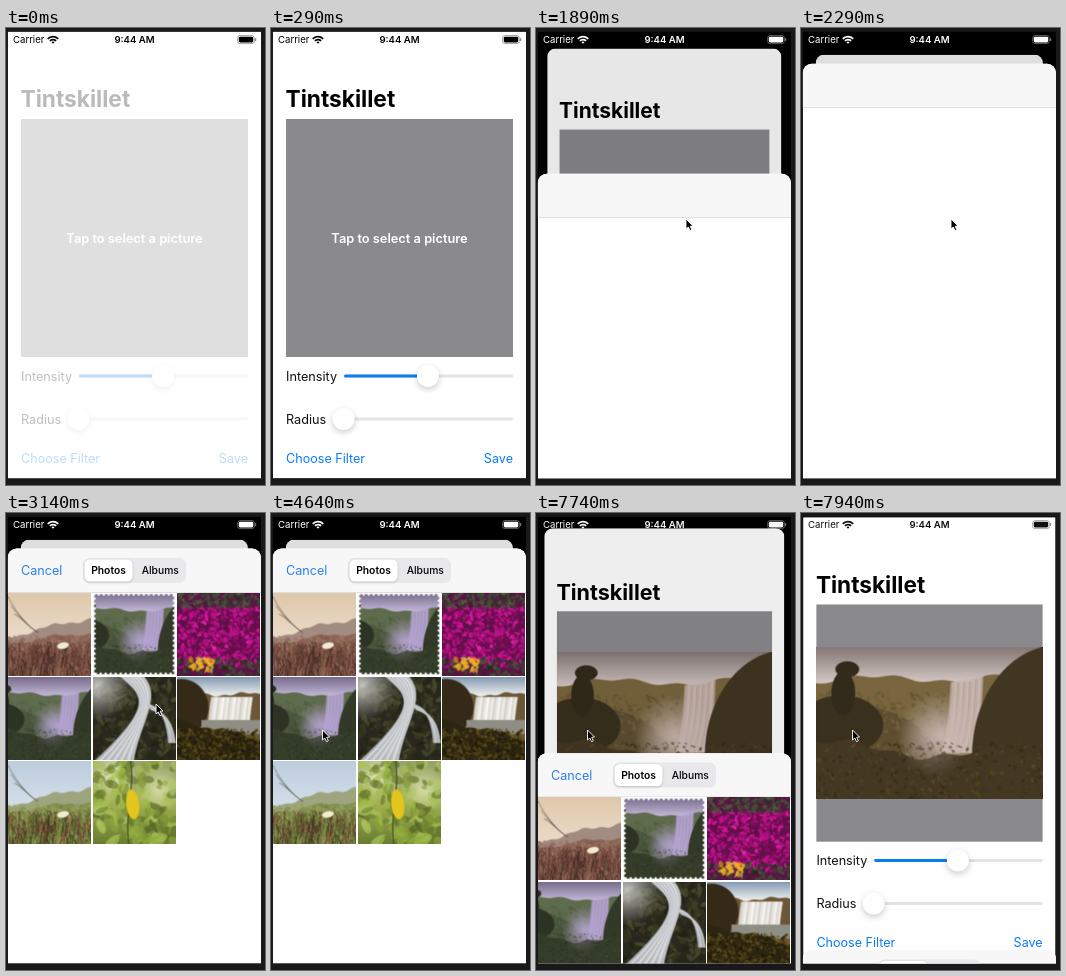
Animation of 259x457 px, one loop 7990 ms. Source, as an HTML page with a canvas:

```html
<!DOCTYPE html>
<html lang="en">
<head>
<meta charset="utf-8">
<title>Photo filter app</title>
<style>
html, body { margin: 0; width: 100%; height: 100%; overflow: hidden; background: #19191b; }
canvas { display: block; width: 259px; height: 457px; }
</style>
</head>
<body>
<canvas id="stage"></canvas>
<script>
const W = 259, H = 457, LOOP = 7990;
const SCREEN = { x: 1.7, y: 3.4, w: 253.3, h: 447.2 };
const BLUE = '#0a7cf5', SHEET_BLUE = '#2b80e8';
const CELL = 83;
const canvas = document.getElementById('stage');
const dpr = window.devicePixelRatio || 1;
canvas.width = W * dpr;
canvas.height = H * dpr;
const ctx = canvas.getContext('2d');

// ---------- drawing helpers ----------
function rect(g, color, x, y, w, h) {
  g.fillStyle = color;
  g.fillRect(x, y, w, h);
}

function fillScreen(color) {
  rect(ctx, color, SCREEN.x, SCREEN.y, SCREEN.w, SCREEN.h);
}

function roundPath(g, x, y, w, h, r) {
  g.beginPath();
  g.roundRect(x, y, w, h, r);
}

function round(g, color, x, y, w, h, r) {
  roundPath(g, x, y, w, h, r);
  g.fillStyle = color;
  g.fill();
}

function blob(g, color, x, y, rx, ry = rx, turn = 0) {
  g.beginPath();
  g.ellipse(x, y, rx, ry, turn, 0, 2 * Math.PI);
  g.fillStyle = color;
  g.fill();
}

function curve(g, color, width, x, y, ...p) {
  g.beginPath();
  g.moveTo(x, y);
  g.bezierCurveTo(...p);
  g.strokeStyle = color;
  g.lineWidth = width;
  g.stroke();
}

function text(str, x, y, size, color, weight = 400, align = 'left') {
  ctx.font = `${weight} ${size}px Inter, "Liberation Sans", sans-serif`;
  ctx.textAlign = align;
  ctx.fillStyle = color;
  ctx.fillText(str, x, y);
}

function withShadow(alpha, blur, drop, paint) {
  ctx.save();
  ctx.shadowColor = `rgba(0,0,0,${alpha})`;
  ctx.shadowBlur = blur * dpr;
  ctx.shadowOffsetY = drop * dpr;
  paint();
  ctx.restore();
}

// ---------- picture helpers ----------
const hsl = (h, s, l, a = 1) => `hsla(${h},${s}%,${l}%,${a})`;

function random(seed) {
  return () => (seed = (seed * 16807) % 2147483647) / 2147483647;
}

function fade(g, h, ...colors) {
  const f = g.createLinearGradient(0, 0, 0, h);
  colors.forEach((c, i) => f.addColorStop(i / (colors.length - 1), c));
  return f;
}

function glow(g, rgb, alpha, x, y, r) {
  const f = g.createRadialGradient(x, y, 0, x, y, r);
  f.addColorStop(0, `rgba(${rgb},${alpha})`);
  f.addColorStop(1, `rgba(${rgb},0)`);
  rect(g, f, x - r, y - r, 2 * r, 2 * r);
}

// uneven land from height y0 on the left to y1 on the right
function ridge(g, color, w, y0, y1, rough) {
  g.beginPath();
  g.moveTo(0, 200);
  for (let x = 0; x <= w; x++) {
    const k = x / w;
    g.lineTo(x, y0 + (y1 - y0) * k + rough * (Math.sin(k * 9 + y0) + .4 * Math.sin(k * 31)));
  }
  g.lineTo(w, 200);
  g.fillStyle = color;
  g.fill();
}

// leafy texture below height y
function specks(g, n, size, w, y, h, hue, sat, light, spread = 10) {
  const rnd = random(n + 5);
  for (let i = 0; i < n; i++)
    blob(g, hsl(hue, sat, light + (rnd() - .5) * 2 * spread, .7),
      rnd() * w, y + rnd() * h, size * (.5 + rnd()), size * (.3 + rnd() * .5), rnd() * 3);
}

function picture(w, h, paint) {
  const c = document.createElement('canvas');
  c.width = w * 2;
  c.height = h * 2;
  const g = c.getContext('2d');
  g.scale(2, 2);
  paint(g);
  g.setTransform(1, 0, 0, 1, 0, 0);
  g.filter = 'blur(1.3px)';
  g.drawImage(c, 0, 0);
  return c;
}

// ---------- pictures ----------
function gorge(g, hue, sat, mist) {
  const tone = l => hsl(hue, sat, l);
  rect(g, `rgb(${mist})`, 0, 0, 227, 152);
  rect(g, fade(g, 40, 'rgba(0,0,0,.35)', 'rgba(255,255,255,.35)'), 0, 0, 227, 152);
  ridge(g, tone(36), 227, 34, 28, 4);
  blob(g, tone(28), 40, 125, 85, 66);
  specks(g, 250, 2.5, 130, 45, 75, hue, sat, 32, 6);
  glow(g, mist, .9, 125, 88, 44);
  for (let i = 0; i < 16; i++)
    curve(g, `rgba(${mist},${.65 + i % 3 * .15})`, 3, 136 + i * 2, 35 - i * .4, 135 + i * 2, 60, 134 + i * 2, 80, 126 + i * 2, 106);
  blob(g, tone(19), 242, 110, 86, 112);
  blob(g, tone(17), 25, 78, 42, 30);
  blob(g, tone(15), 27, 46, 12, 22);
  blob(g, tone(15), 31, 22, 12, 8);
  ridge(g, tone(20), 227, 98, 112, 6);
  specks(g, 420, 2, 227, 96, 56, hue, sat + 8, 20, 7);
  glow(g, mist, .35, 118, 98, 34);
}

const brown = g => gorge(g, 40, 32, '205,186,182');

function violet(g) {
  g.save();
  g.scale(CELL / 152, CELL / 152);
  g.translate(-37, 0);
  gorge(g, 85, 17, '182,164,212');
  g.restore();
}

function torn(g) {
  violet(g);
  g.strokeStyle = '#fff';
  for (const width of [3, 6]) {
    g.lineWidth = width;
    g.strokeRect(0, 0, CELL, CELL);
    g.setLineDash([2, 3]);
  }
}

function meadow(g, sky, hue, sat, red) {
  rect(g, sky, 0, 0, CELL, CELL);
  rect(g, fade(g, 40, 'rgba(255,255,255,0)', 'rgba(255,255,255,.3)'), 0, 0, CELL, CELL);
  ridge(g, hsl(hue, sat * .5, 57), CELL, 44, 25, 2);
  ridge(g, hsl(hue, sat * .8, 44), CELL, 50, 40, 2);
  specks(g, 260, 1.8, CELL, 44, 24, hue, sat * .8, 46, 10);
  for (let i = 0; i < 3; i++) curve(g, hsl(hue, 12, 32, .8), .6, i * 3, 4 + i * 9, 8, 20, 20, 34, 30, 40);
  const rnd = random(9);
  for (let i = 0; i < 420; i++) {
    const x = rnd() * 86, y = 60 + rnd() * 30;
    curve(g, hsl(i % 3 ? hue : red, sat, 18 + rnd() * 26), .9, x, y, x, y - 4, x + 1, y - 8, x + rnd() * 8 - 4, y - 11);
  }
  blob(g, '#f3ead2', 55, 53, 6, 3.2, -.2);
}

function blossoms(g) {
  rect(g, hsl(318, 70, 22), 0, 0, CELL, CELL);
  specks(g, 650, 2.3, CELL, 14, 60, 318, 85, 38, 17);
  specks(g, 180, 2.3, CELL, 0, 15, 95, 18, 25);
  specks(g, 140, 2.2, CELL, 66, 18, 100, 25, 22);
  g.translate(12, 0);
  specks(g, 28, 3, 24, 66, 12, 42, 92, 54);
}

function rapids(g) {
  rect(g, hsl(60, 12, 14), 0, 0, CELL, CELL);
  specks(g, 280, 4, CELL, 0, CELL, 62, 25, 18, 9);
  glow(g, '225,225,225', .8, 4, 8, 36);
  for (let i = 0; i < 22; i++) {
    const white = hsl(220, 6, 68 + i * 7 % 27, .85);
    curve(g, white, 2.4, 27 + i, -2, 50 + i, 18, 66 - i, 26 + i, 2 + i * 1.8, 85);
    if (i < 7) curve(g, white, 1.6, 52 + i, 26 + i, 68, 30 + i, 74 + i, 40, 76 + i, 66);
  }
}

function cove(g) {
  rect(g, fade(g, 36, '#8499b2', '#e9ecea', '#f0e6d2'), 0, 0, CELL, CELL);
  ridge(g, hsl(36, 32, 32), CELL, 16, 18, 2);
  for (let i = 0; i < 18; i++)
    curve(g, hsl(40, 15, 80 + i * 7 % 18), 2.6, 35 + i * 2.3, 20, 34 + i * 2.3, 26, 33 + i * 2.3, 34, 32 + i * 2.3, 44);
  blob(g, hsl(36, 38, 15), 4, 30, 27, 28);
  rect(g, '#8f8e84', 24, 43, 60, 14);
  ridge(g, hsl(44, 45, 12), CELL, 43, 62, 2);
  specks(g, 380, 2, CELL, 53, 32, 46, 55, 17, 12);
}

function leaves(g) {
  rect(g, fade(g, CELL, '#98a36c', '#a3b153', '#687c30'), 0, 0, CELL, CELL);
  glow(g, '238,240,215', .9, 20, 14, 26);
  glow(g, '228,232,190', .8, 66, 28, 24);
  specks(g, 130, 6, CELL, 0, CELL, 74, 46, 43, 17);
  curve(g, hsl(80, 35, 24), 1.3, 38, 0, 42, 30, 32, 50, 36, CELL);
  blob(g, '#e3c51d', 40, 43, 6.5, 15, -.1);
}

const photo = picture(227, 152, brown);
const thumbs = [
  g => meadow(g, '#dfc8ab', 18, 30, 6), torn, blossoms,
  violet, rapids, cove,
  g => meadow(g, '#bdcddd', 72, 36, 8), leaves
].map(paint => picture(CELL, CELL, paint));

// ---------- interface ----------
function slider(label, y, x, knob) {
  text(label, 15, y + 4.5, 12.7, '#111');
  round(ctx, '#e4e4e6', x, y - 1.5, 242 - x, 3, 1.5);
  if (knob > x + 11) round(ctx, BLUE, x, y - 1.5, knob - x, 3, 1.5);
  withShadow(.2, 6, 2.5, () => blob(ctx, '#fff', knob, y, 11));
}

function drawMain(t) {
  fillScreen('#fff');
  text('Tintskillet', 14.5, 79, 22.7, '#000', 700);
  rect(ctx, '#8a8a8d', 15, 91, 227, 238);
  if (t >= 6940) ctx.drawImage(photo, 15, 134, 227, 152);
  else text('Tap to select a picture', 128.5, 214.5, 12.8, '#fff', 600, 'center');
  slider('Intensity', 348, 73, 157);
  slider('Radius', 391, 62, 72.5);
  const tint = t >= 1490 && t < 7700 ? '#aaaaac' : BLUE;
  text('Choose Filter', 15, 434.5, 12.6, tint);
  text('Save', 242, 434.5, 12.6, tint, 400, 'right');
  const veil = Math.max(0, .73 * (1 - t / 290));
  rect(ctx, `rgba(255,255,255,${veil})`, SCREEN.x, 22, SCREEN.w, 428.6);
}

// the main view shrinks into a dimmed card behind the sheet
function drawCard(t, p) {
  const s = 1 - .103 * p;
  ctx.save();
  ctx.translate(SCREEN.x + 13 * p, SCREEN.y + 23.4 * p);
  ctx.scale(s, s);
  ctx.translate(-SCREEN.x, -SCREEN.y);
  roundPath(ctx, SCREEN.x, SCREEN.y, SCREEN.w, SCREEN.h, 9 * Math.min(1, p * 2));
  ctx.clip();
  drawMain(t);
  fillScreen(`rgba(0,0,0,${.13 * p})`);
  ctx.restore();
}

function drawStatus(p) {
  const v = Math.round(255 * Math.min(1, p * 1.9));
  const c = `rgb(${v},${v},${v})`;
  text('Carrier', 7, 15, 9.6, c);
  text('9:44 AM', 128.5, 15, 9.6, c, 600, 'center');
  ctx.strokeStyle = c;
  ctx.lineWidth = 1.8;
  for (let r = 1.2; r < 8; r += 3) {
    ctx.beginPath();
    ctx.arc(47, 15.8, r, -Math.PI * .76, -Math.PI * .24);
    ctx.stroke();
  }
  ctx.globalAlpha = .45;
  ctx.lineWidth = .8;
  roundPath(ctx, 231.7, 7.6, 16.6, 8, 2.3);
  ctx.stroke();
  round(ctx, c, 249, 10, 1.2, 3, .6);
  ctx.globalAlpha = 1;
  round(ctx, c, 232.8, 8.7, 14.4, 5.8, 1.4);
}

function drawSheet(t, p) {
  ctx.save();
  ctx.translate(0, 415 * (1 - p));
  roundPath(ctx, SCREEN.x, 35.6, SCREEN.w, 430, 9);
  ctx.clip();
  fillScreen('#fff');
  rect(ctx, '#f7f7f7', 0, 35, W, 44.5);
  rect(ctx, '#d4d4d6', 0, 79, W, .7);
  if (t >= 2840) {
    text('Cancel', 15, 62, 12.6, SHEET_BLUE);
    round(ctx, '#e8e8ea', 77, 45, 103, 25, 6.5);
    withShadow(.18, 3, 1, () => round(ctx, '#fff', 78.5, 46.5, 48, 22, 5.5));
    text('Photos', 102.5, 61.3, 10.3, '#000', 600, 'center');
    text('Albums', 154.3, 61.3, 10.3, '#000', 500, 'center');
    thumbs.forEach((img, i) =>
      ctx.drawImage(img, 2 + (i % 3) * 84.7, 79.6 + Math.floor(i / 3) * 84.4, CELL, CELL));
  }
  ctx.restore();
}

// ---------- motion ----------
const spring = ms => ms <= 0 ? 0 : 1 - (1 + .018 * ms) * Math.exp(-.018 * ms);
const smooth = k => k * k * (3 - 2 * k);

function sheetAmount(t) {
  return t < 7740 ? spring(t - 1745) : 1 - spring(t - 7648);
}

// start, end, x, y
const MOVES = [[690, 1340, 150, 191], [3590, 3890, 144, 195], [4040, 4640, 51.5, 217]];

function cursorAt(t) {
  let x = 172, y = 252;
  for (const [a, b, nx, ny] of MOVES) {
    const k = smooth(Math.min(1, Math.max(0, (t - a) / (b - a))));
    x += (nx - x) * k;
    y += (ny - y) * k;
  }
  return [x, y];
}

function drawRing(t) {
  if (t < 6740 || t >= 7040) return;
  ctx.globalAlpha = t < 6940 ? 1 : .4;
  blob(ctx, 'rgba(255,255,255,.12)', 51, 217, 14);
  ctx.strokeStyle = '#111';
  ctx.lineWidth = 1.1;
  ctx.stroke();
  ctx.globalAlpha = 1;
}

const ARROW = new Path2D('M0 0V10L2.3 8 4 11.6 5.8 10.8 4.2 7.3 7 7Z');

function drawCursor(t) {
  if (t < 440) return;
  ctx.save();
  ctx.translate(...cursorAt(t));
  ctx.fillStyle = '#000';
  ctx.fill(ARROW);
  ctx.strokeStyle = '#fff';
  ctx.lineWidth = .9;
  ctx.stroke(ARROW);
  ctx.restore();
}

function draw(now) {
  // the picture advances in 50 ms steps
  const t = Math.max(0, Math.floor((now % LOOP - 40) / 50) * 50 + 40);
  const p = sheetAmount(t);
  ctx.setTransform(dpr, 0, 0, dpr, 0, 0);
  rect(ctx, '#19191b', 0, 0, W, H);
  ctx.save();
  ctx.beginPath();
  ctx.rect(SCREEN.x, SCREEN.y, SCREEN.w, SCREEN.h);
  ctx.clip();
  fillScreen('#000');
  drawCard(t, p);
  drawStatus(p);
  if (p > 0) drawSheet(t, p);
  drawRing(t);
  drawCursor(t);
  ctx.restore();
}

const start = performance.now();
function tick() {
  draw(performance.now() - start);
  requestAnimationFrame(tick);
}
tick();
</script>
</body>
</html>
```
